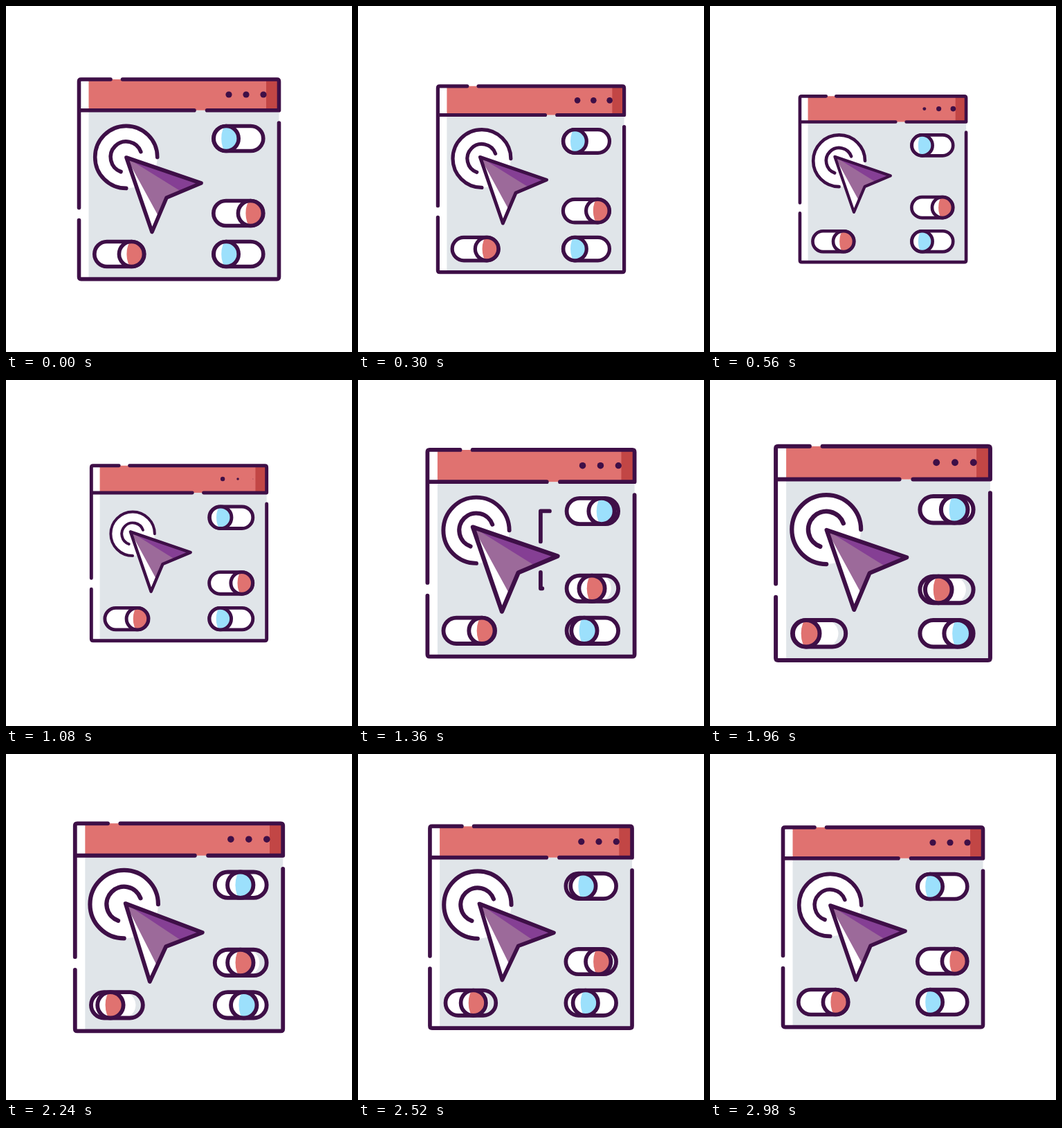
Write an HTML page that moves like this. It is 500 by 500 pixels and loops after 3000 ms.

```html
<!DOCTYPE html>
<html lang="en">
<head>
<meta charset="utf-8">
<title>Window with switches</title>
<style>
  html, body { margin: 0; width: 100%; height: 100%; overflow: hidden; background: #fff; }
  svg { display: block; width: 100vw; height: 100vh; }
  .line { fill: none; stroke: #3e0f47; stroke-width: 5.6; stroke-linecap: round; stroke-linejoin: round; }
  .ink { fill: #3e0f47; }
  .white { fill: #fff; }
  .grey { fill: #e0e5e9; }
  .red { fill: #e07270; }
  .blue { fill: #9ce0fc; }
</style>
</head>
<body>
<svg viewBox="0 0 500 500">
  <defs>
    <clipPath id="frame"><rect x="-144.5" y="-144" width="289" height="288.6" rx="3"/></clipPath>
  </defs>
  <g id="stage">
    <g clip-path="url(#frame)">
      <rect class="white" x="-145" y="-145" width="290" height="290"/>
      <rect class="grey" x="-130.5" y="-99.3" width="276" height="245"/>
      <rect class="red" x="-130.5" y="-145" width="276" height="45.7"/>
      <rect fill="#c24645" x="126" y="-145" width="20" height="45.7"/>
    </g>
    <path class="line" d="M-99 -144H-141.5Q-144.5 -144 -144.5 -141V41.5M-144.5 59.5V141.6Q-144.5 144.6 -141.5 144.6H141.5Q144.5 144.6 144.5 141.6V-81M144.5 -99.3V-141Q144.5 -144 141.5 -144H-81.5M-144.5 -99.3H22M40.5 -99.3H144.5"/>
    <g id="dots"></g>
    <g id="switches"></g>
    <path class="line" id="linkTop" d="M26 -58.5H13.4V-16"/>
    <path class="line" id="linkBottom" d="M13.4 27V49.5H26"/>
    <g id="outerRing">
      <circle class="white" r="45"/>
      <path class="line" d="M45 0A45 45 0 1 0 0 45"/>
    </g>
    <g id="innerRing"><path class="line" d="M21.1 -7.8A22.5 22.5 0 1 0 -7.7 21.1"/></g>
    <g id="cursor">
      <path class="white" d="M-54 -54L54 -17L4 4L-17 53.5Z"/>
      <path fill="#9c6a9a" d="M-54 -54L54 -17L4 4L-7.6 31Z"/>
      <path fill="#853f94" d="M-54 -54L54 -17L25 -5Z"/>
      <path class="line" d="M-54 -54L54 -17L4 4L-17 53.5Z"/>
    </g>
  </g>
</svg>
<script>
const LOOP = 3000;
const get = id => document.getElementById(id);
const clamp = (v, lo, hi) => Math.min(hi, Math.max(lo, v));

// Smooth progress from 0 to 1 between two times.
const ease = (t, from, to) => {
  const u = clamp((t - from) / (to - from), 0, 1);
  return u * u * (3 - 2 * u);
};

// Eased value along [time, value] keys.
function track(keys, t) {
  let value = keys[0][1];
  for (let i = 1; i < keys.length; i++) {
    value += (keys[i][1] - keys[i - 1][1]) * ease(t, keys[i - 1][0], keys[i][0]);
  }
  return value;
}

const tracks = {
  stage: [[0, 1], [800, .785], [1580, 1.095], [2770, 1]],
  shift: [[0, 0], [800, -17], [1360, 0]],
  cursor: [[0, 1], [700, .885], [980, .885], [1400, 1.1], [1800, 1]],
  turn: [[1960, 0], [2400, 2.5], [2560, 2.3], [2960, 0]],
  outer: [[560, 1], [1050, .8], [1400, 1.03], [1960, 1.035], [2520, 1.07], [2980, 1]],
  inner: [[560, 1], [1030, .79], [1440, 1.09], [2520, 1.08], [2980, 1]]
};

const switches = [
  { x: 85.8, y: -58.5, side: -1, color: 'blue', back: [1590, 2870] },
  { x: 85.8, y: 49.5, side: 1, color: 'red', back: [1600, 2900] },
  { x: 85.8, y: 108.5, side: -1, color: 'blue', back: [1750, 2930] },
  { x: -86.2, y: 108.5, side: 1, color: 'red', back: [1890, 2990] }
];

get('switches').innerHTML = switches.map(({ x, y, side, color }) => {
  const inset = side > 0 ? 10 : 0;
  return `<g transform="translate(${x} ${y})">
    <rect class="grey" x="-36" y="-18" width="72" height="36" rx="18"/>
    <rect class="white" x="-36" y="-18" width="${72 - inset}" height="36" rx="18"/>
    <rect class="line" x="-36" y="-18" width="72" height="36" rx="18"/>
    <g class="knob"><circle class="white" r="18"/>
      <path class="${color}" d="M0 -18A18 18 0 0 1 0 18A7 18 0 0 1 0 -18"/>
      <circle class="line" r="18"/></g>
  </g>`;
}).join('');
const knobs = [...document.querySelectorAll('.knob')];

get('dots').innerHTML = [72, 97, 122]
  .map(x => `<circle class="ink" cx="${x}" cy="-122"/>`).join('');
const dots = [...get('dots').children];

// Shows the part of a line that lies between two distances along the whole link.
function trim(id, offset, length, from, to) {
  const a = clamp(from - offset, 0, length), b = clamp(to - offset, 0, length);
  const path = get(id);
  path.style.display = b - a > .1 ? '' : 'none';
  path.setAttribute('stroke-dasharray', `0 ${a} ${b - a} 1000`);
}

const place = (id, transform) => get(id).setAttribute('transform', transform);

function draw(t) {
  const at = name => track(tracks[name], t);
  place('stage', `translate(250 250) scale(${at('stage')})`);
  place('outerRing', `translate(-76.3 -31.6) scale(${at('outer')})`);
  place('innerRing', `translate(-76.3 -31.6) scale(${at('inner')})`);
  const shift = at('shift');
  place('cursor', `translate(${shift - 22} ${shift + 23}) rotate(${at('turn')}) scale(${at('cursor')})`);

  dots.forEach((dot, i) => {
    const start = 400 + i * 100;
    dot.setAttribute('r', 4.6 * track([[start, 1], [start + 400, 0], [start + 800, 1]], t));
  });

  knobs.forEach((knob, i) => {
    const { side, back } = switches[i];
    const start = 1055 + i * 100;
    const moved = ease(t, start, start + 400) - ease(t, ...back);
    knob.setAttribute('transform', `translate(${side * 17.6 * (1 - 2 * moved)} 0)`);
  });

  const head = 134 * ease(t, 1100, 1417), tail = 134 * ease(t, 1500, 1820);
  trim('linkTop', 0, 55.1, tail, head);
  trim('linkBottom', 98.1, 35.1, tail, head);
}

function tick() {
  draw(performance.now() % LOOP);
  requestAnimationFrame(tick);
}
tick();
</script>
</body>
</html>
```
